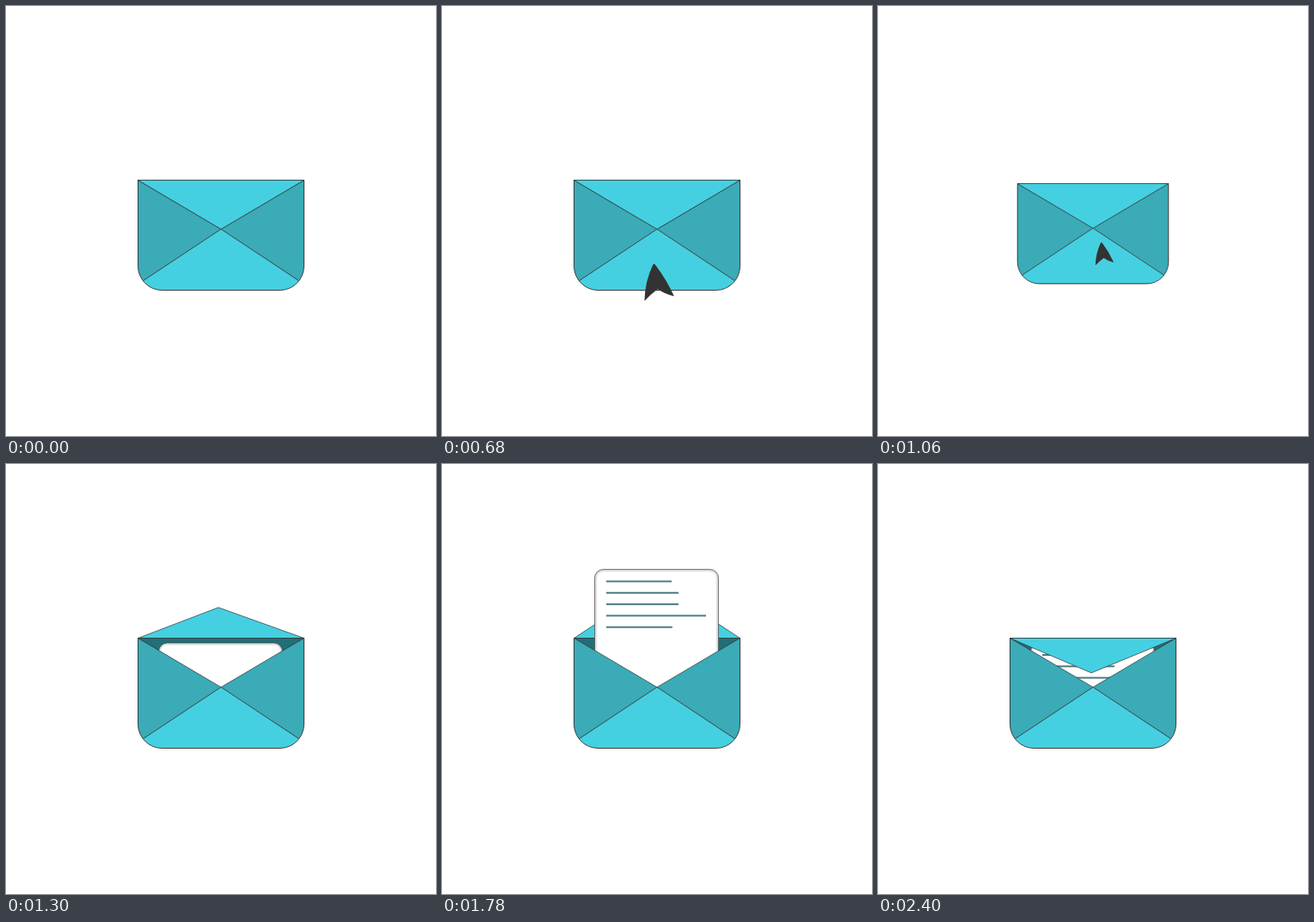
An HTML page with a canvas that plays this animation: 500 px wide and 500 px high, repeating every 2420 ms.

```html
<!DOCTYPE html>
<html>
<head>
<meta charset="utf-8">
<style>
html, body { margin: 0; width: 100%; height: 100%; overflow: hidden; background: #fff; }
canvas { display: block; }
</style>
</head>
<body>
<canvas id="stage" width="500" height="500"></canvas>
<script>
const LOOP = 2420, STEP = 20;
const LIGHT = '#45d0e2', SIDE = '#3aabb7', INSIDE = '#226f77', INK = '#333';
const L = 153.5, R = 346.5, TOP = 202.5, BOTTOM = 330.5, MID = 250, FOLD = 259.5;
const LINE_WIDTHS = [76, 84, 84, 116, 116];
const c = document.getElementById('stage').getContext('2d');

const prog = (t, a, b) => Math.min(1, Math.max(0, (t - a) / (b - a)));
const mix = (a, b, k) => a + (b - a) * k;
const smooth = k => k * k * (3 - 2 * k);
const easeOut = k => 1 - (1 - k) ** 2;

function paint(path, fill, width = 0.7) {
  c.fillStyle = fill;
  c.fill(path);
  if (!width) return;
  c.strokeStyle = INK;
  c.lineWidth = width;
  c.stroke(path);
}

function poly(...points) {
  const path = new Path2D();
  points.forEach(([x, y]) => path.lineTo(x, y));
  path.closePath();
  return path;
}

const body = new Path2D();
body.roundRect(L, TOP, R - L, BOTTOM - TOP, [0, 0, 28, 28]);
const inside = poly([L, TOP], [R, TOP], [MID, FOLD]);
const leftSide = poly([L, TOP], [MID, FOLD], [159.5, 319.5], [L, 323.5]);
const rightSide = poly([R, TOP], [MID, FOLD], [340.5, 319.5], [R, 323.5]);
const front = poly([L, 323.5], [MID, FOLD], [R, 323.5], [R, BOTTOM], [L, BOTTOM]);
const arrow = new Path2D('M-1.5 .5Q0 -.6 1.5 1.5Q14 18 23 37.5Q12 35 4 29Q-4 35 -11.5 43Q-11 20 -1.5 .5Z');

// open: 0 = shut, 1 = fully raised
function drawFlap(open) {
  const tip = [MID - 4.6 * Math.sin(Math.PI * open), mix(FOLD, 139, open)];
  paint(poly([L, TOP], [R, TOP], tip), LIGHT);
}

function drawPaper(top, t) {
  const sheet = new Path2D();
  sheet.roundRect(177.5, top, 144, 300 - top, [10, 10, 0, 0]);
  paint(sheet, '#fff', 0);
  c.save();
  c.clip(sheet);
  c.strokeStyle = 'rgba(0,0,0,.07)';
  for (const w of [6, 4, 2]) {
    c.lineWidth = w;
    c.stroke(sheet);
  }
  c.restore();
  c.strokeStyle = INK;
  c.lineWidth = 0.6;
  c.stroke(sheet);

  c.fillStyle = '#4a7d83';
  LINE_WIDTHS.forEach((w, i) => {
    const start = 1330 + 86 * i;
    c.fillRect(191, top + 13 + 13.3 * i, w * prog(t, start, start + 160), 2);
  });
}

function drawPockets() {
  c.save();
  c.clip(body);
  paint(leftSide, SIDE);
  paint(rightSide, SIDE);
  paint(front, LIGHT);
  c.restore();
  const edge = new Path2D(`M${L} ${TOP}V302.5A28 28 0 0 0 181.5 ${BOTTOM}H318.5A28 28 0 0 0 ${R} 302.5V${TOP}`);
  c.strokeStyle = INK;
  c.lineWidth = 0.9;
  c.stroke(edge);
}

function drawCursor(t) {
  if (t < 260 || t >= 1180) return;
  const u = prog(t, 260, 780), a = u * (u - 0.3077), b = a * (u - 0.8077);
  const press = smooth(prog(t, 860, 1060));
  const x = 505 - 429 * u + 219 * a + 258 * b - 2 * press;
  const y = 427 - 81.25 * u - 152 * a + 281 * b - 3 * press;
  const size = mix(1, 0.62, press) * (1 - prog(t, 1060, 1180));
  c.save();
  c.translate(x, y);
  c.scale(size, size);
  paint(arrow, INK, 0);
  c.restore();
}

function draw(t) {
  const open = prog(t, 1180, 1336) - prog(t, 2300, 2416);
  const rise = mix(208, 115, easeOut(prog(t, 1340, 1634)));
  const top = rise + 8.5 * smooth(prog(t, 1634, 1820)) + 84.5 * smooth(prog(t, 2190, 2320));
  const squeeze = 1 - 0.09 * (smooth(prog(t, 860, 1060)) - smooth(prog(t, 1060, 1180)));

  c.fillStyle = '#fff';
  c.fillRect(0, 0, 500, 500);
  c.save();
  c.translate(MID, 247);
  c.scale(squeeze, squeeze);
  c.translate(-MID, -247);
  if (open > 0.5) drawFlap(open);
  paint(inside, INSIDE);
  if (open > 0) drawPaper(top, t);
  drawPockets();
  if (open <= 0.5) drawFlap(open);
  c.restore();
  drawCursor(t);
}

const begin = performance.now();
function tick() {
  const t = (performance.now() - begin) % LOOP;
  draw(Math.floor(t / STEP) * STEP);
  requestAnimationFrame(tick);
}
tick();
</script>
</body>
</html>
```
